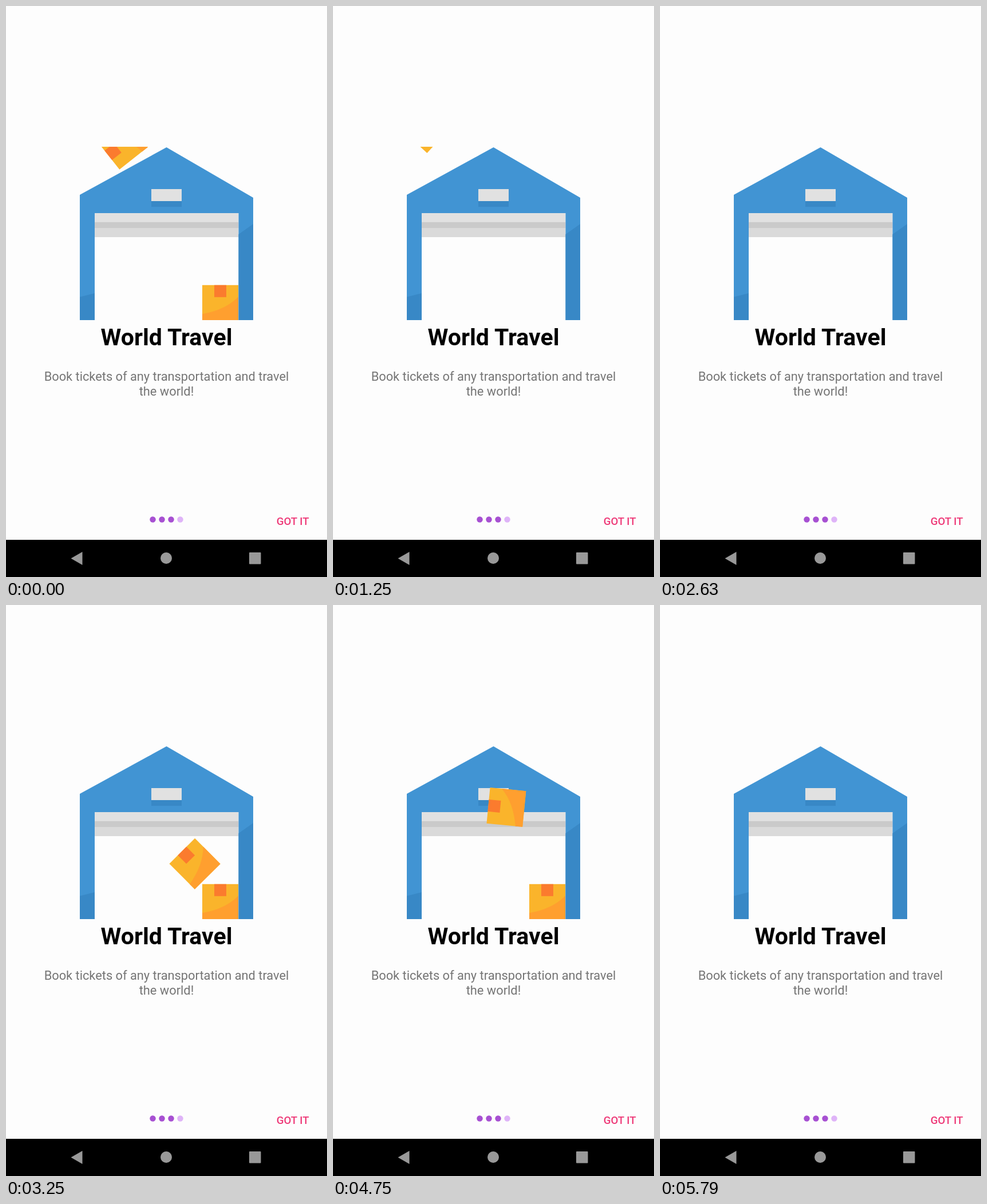
Write an HTML page that moves like this. It is 561 px wide and 998 px high and loops after 5830 ms.

```html
<!DOCTYPE html>
<html lang="en">
<head>
<meta charset="utf-8">
<title>World Travel</title>
<style>
  html, body { margin: 0; width: 100%; height: 100%; overflow: hidden; background: #fdfdfd; }
  svg { display: block; width: 561px; height: 998px; }
  text { font-family: Roboto, sans-serif; text-anchor: middle; }
</style>
</head>
<body>
<svg viewBox="0 0 561 998">
  <defs>
    <clipPath id="view"><rect x="129" y="246" width="303" height="303"/></clipPath>
    <g id="box">
      <rect x="-31.5" y="-31.5" width="63" height="63" fill="#fab42b"/>
      <path d="M31.5-11Q9 12-31.5 19V31.5H31.5Z" fill="#ff9f2f"/>
      <rect x="-10.5" y="-31.5" width="21" height="21" fill="#fb7b2e"/>
    </g>
  </defs>
  <rect width="561" height="998" fill="#fdfdfd"/>

  <g clip-path="url(#view)">
    <path d="M155 362H406.5V377.5H155Z" fill="#e1e1e1"/>
    <path d="M155 377.5H406.5V388H155Z" fill="#cacaca"/>
    <path d="M155 388H406.5V404H155Z" fill="#dadada"/>
    <path d="M280.5 247L432 335V549H406.5V362H155V549H129V330Z" fill="#4194d3"/>
    <path d="M129 508.500L155 502V549H129ZM406.500 399L432 381V549H406.500ZM254 341H307V351H254Z" fill="#3888c6"/>
    <rect x="254" y="320" width="53" height="21" fill="#e1e1e1"/>
    <g id="boxes"></g>
  </g>

  <text x="280.5" y="593" font-size="41" font-weight="700">World Travel</text>
  <g font-size="21.8" fill="#757575">
    <text x="280.5" y="655">Book tickets of any transportation and travel</text>
    <text x="280.5" y="680.5">the world!</text>
  </g>
  <text x="501.3" y="907" font-size="18.8" font-weight="500" fill="#ee3b79">GOT IT</text>

  <g fill="#a750d2">
    <circle cx="256.5" cy="897.5" r="5.2"/>
    <circle cx="272.5" cy="897.5" r="5.2"/>
    <circle cx="288.5" cy="897.5" r="5.2"/>
    <circle cx="304.5" cy="897.5" r="5.2" fill="#dfb4f8"/>
  </g>

  <rect y="933" width="561" height="65"/>
  <g fill="#999">
    <path d="M113.500 965.500L133.500 954V977Z"/>
    <circle cx="280" cy="965" r="10"/>
    <rect x="425" y="955" width="20.500" height="20.500" rx="1"/>
  </g>
</svg>
<script>
const LOOP = 5830, FLIGHT = 480;

// Waypoints of each box: x, y, rotation
const paths = [
  [[70, 125, -180], [161, 211, -138], [290, 335, -85], [352, 445, -45], [374.5, 519.3, 0]],
  [[90, 140, -175], [202, 240, -129], [302, 352, -85], [330, 452, -45], [311.5, 519.3, 0]],
  [[60, 150, -165], [173, 256, -122], [318, 322, -82], [338, 402, -45], [374.5, 456.5, 0]]
];

// Each cycle clears the floor, then launches the three boxes
const cycles = [
  { clear: -1000, launch: [-600, -84, 300] },
  { clear: 1000, launch: [1166, 1390, 1796] },
  { clear: 2540, launch: [2700, 2961, 3421] },
  { clear: 4170, launch: [4260, 4572, 5080] },
  { clear: 5710, launch: [5920, 6240, 6700] }
];

const group = document.getElementById('boxes');
const boxes = paths.map(() => {
  const use = document.createElementNS('http://www.w3.org/2000/svg', 'use');
  use.setAttribute('href', '#box');
  return group.appendChild(use);
});

// Catmull-Rom spline through the waypoints
function along(path, progress) {
  const last = path.length - 1;
  const i = Math.min(last - 1, Math.floor(progress * last));
  const f = progress * last - i;
  const at = k => path[Math.max(0, Math.min(last, k))];
  return path[i].map((b, k) => {
    const a = at(i - 1)[k], c = at(i + 1)[k], d = at(i + 2)[k];
    return b + f / 2 * (c - a + f * (2 * a - 5 * b + 4 * c - d + f * (3 * (b - c) + d - a)));
  });
}

function draw(now) {
  let t = now % LOOP;
  if (t > 80 && t < 790) t = 80; // playback stalls here
  const cycle = cycles.findLast(c => c.clear <= t);
  boxes.forEach((box, i) => {
    const x = (t - cycle.launch[i]) / FLIGHT;
    box.style.display = x < 0 ? 'none' : '';
    if (x < 0) return;
    const [px, py, angle] = along(paths[i], 1 - (1 - Math.min(1, x)) ** 1.5);
    box.setAttribute('transform', `translate(${px} ${py}) rotate(${angle})`);
  });
}

const start = performance.now();
function tick() {
  draw(performance.now() - start);
  requestAnimationFrame(tick);
}
tick();
</script>
</body>
</html>
```
